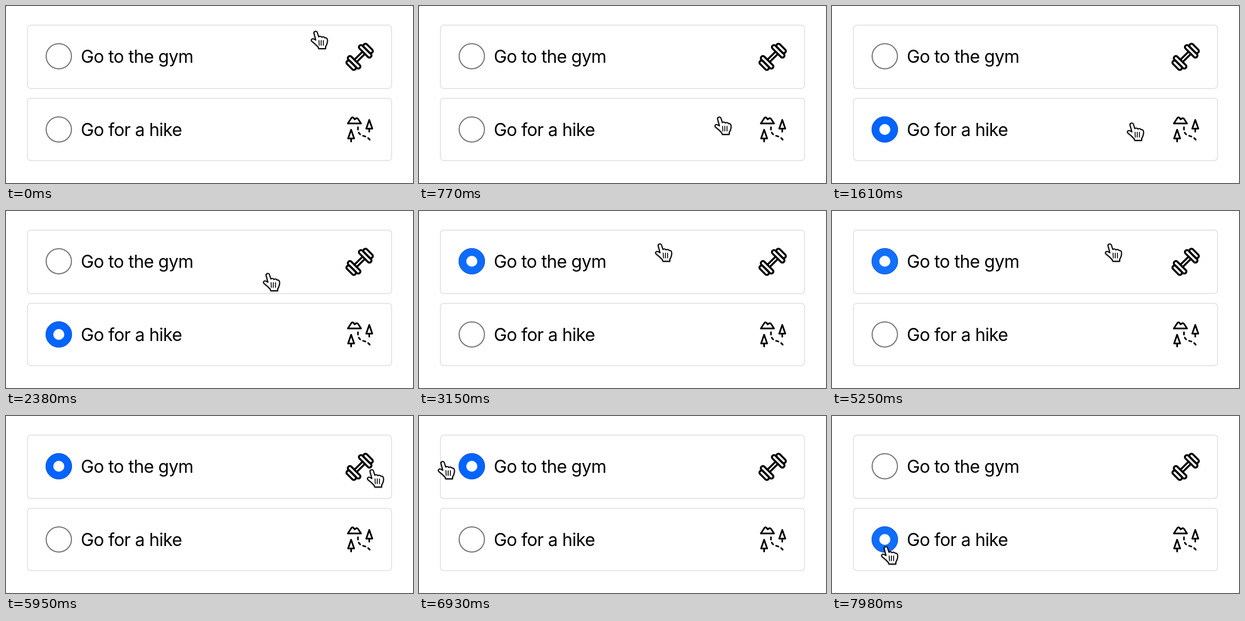
Write an HTML page that moves like this. It is 740x324 px and loops after 8000 ms.

```html
<!DOCTYPE html>
<html lang="en">
<head>
<meta charset="utf-8">
<title>Radio cards</title>
<style>
  html, body { margin: 0; width: 100%; height: 100%; overflow: hidden; background: #fff; }
  svg { display: block; }
  text { font: 32px Inter, "Liberation Sans", sans-serif; letter-spacing: -.67px; }
  .card { fill: #fff; stroke: #e6e6e6; stroke-width: 2; }
  .ring { fill: #fff; stroke: #767676; stroke-width: 2; }
  .icon { fill: none; stroke: #000; stroke-width: 3; stroke-linecap: round; stroke-linejoin: round; }
  .bold { stroke-width: 3.6; }
  #hand { fill: #fff; stroke: #000; stroke-width: 2; stroke-linecap: round; stroke-linejoin: round;
    filter: drop-shadow(0 1.5px 1px #0006); }
</style>
</head>
<body>
<svg width="740" height="324" viewBox="0 0 740 324">
  <rect class="card" x="39" y="35" width="662" height="116" rx="6"/>
  <rect class="card" x="39" y="169" width="662" height="114" rx="6"/>
  <circle class="ring" cx="96" cy="92" r="23"/>
  <circle class="ring" cx="96" cy="226" r="23"/>
  <g id="dot">
    <circle id="disc" cx="96" r="23.5" stroke="#0a5be0"/>
    <circle cx="96" r="10" fill="#fff"/>
  </g>
  <text x="136" y="104">Go to the gym</text>
  <text x="136" y="238">Go for a hike</text>

  <g class="icon bold" transform="translate(643 93) rotate(-45)">
    <path d="M-10.5-3H10.5M-10.5 3H10.5"/>
    <g id="plates">
      <rect x="10.5" y="-14.5" width="7.5" height="29" rx="3.5"/>
      <rect x="18" y="-10.5" width="7.5" height="21" rx="3.5"/>
    </g>
    <use href="#plates" transform="scale(-1 1)"/>
  </g>

  <g class="icon">
    <path d="M621.5 215L628 205Q630 202.500 632 205L634 207.500L636 206Q638 204.500 640 206.500L645.500 215Z"/>
    <path id="tree" d="M660.500 208.500L655 224.500H666ZM660.500 225V230"/>
    <use href="#tree" x="-33" y="18"/>
    <path d="M640 222Q639 235 649 237.500T662 246" stroke-dasharray="4 6"/>
  </g>

  <g id="hand">
    <path d="M5 4C4 .5 10-1.500 11 2.500L13.500 10.500C15 9 18 9.200 19 11.200C21 9.800 24 10.300 25 12.500C27.500 11.800 29 13.500 29.300 16C30 21 28 25 26 28.500V32H13.500L12.500 29C9 25 5 21.500 1 18.500C-1 16 1.500 13 4.500 14.300L8.300 16.500Z"/>
    <path d="M14 17L14.500 26M18 17V26M22 17V26" stroke-width="1.6"/>
  </g>
</svg>
<script>
const $ = id => document.getElementById(id);
const LOOP = 8000, STEP = 70;
const start = { x: 555, y: 46 };

// Each move eases to x, y; bend bows the way up or down
const moves = [
  { from: 0, to: 910, x: 537, y: 214 },
  { from: 1960, to: 2660, x: 430, y: 60 },
  { from: 3500, to: 3850, x: 426, y: 196 },
  { from: 4760, to: 5180, x: 497, y: 60 },
  { from: 5390, to: 5910, x: 657, y: 98, bend: -40 },
  { from: 6000, to: 6790, x: 35, y: 66, bend: -42 },
  { from: 6890, to: 7770, x: 90, y: 239, bend: 110 }
];
// Clicks select the lower and the upper card in turn
const clicks = [1050, 3010, 4200, 5250, 7910];

function pointer(t) {
  let { x, y } = start;
  for (const m of moves) {
    const u = Math.min(1, Math.max(0, (t - m.from) / (m.to - m.from)));
    const ease = u * u * (3 - 2 * u);
    x += (m.x - x) * ease;
    y += (m.y - y) * ease + (m.bend || 0) * Math.sin(Math.PI * u);
  }
  return [Math.round(x), Math.round(y)];
}

function draw(now) {
  const t = Math.floor(now % LOOP / STEP) * STEP;
  const count = clicks.filter(c => c <= t).length;
  const glow = Math.max(0, 1 - (t - clicks[count - 1]) / 420);
  $('dot').setAttribute('visibility', count ? 'visible' : 'hidden');
  $('dot').setAttribute('transform', `translate(0 ${count % 2 ? 226 : 92})`);
  if (count) $('disc').setAttribute('fill', `rgb(${18 * glow},${100 + 12 * glow},255)`);
  $('hand').setAttribute('transform', `translate(${pointer(t)})`);
  requestAnimationFrame(draw);
}
requestAnimationFrame(draw);
</script>
</body>
</html>
```
